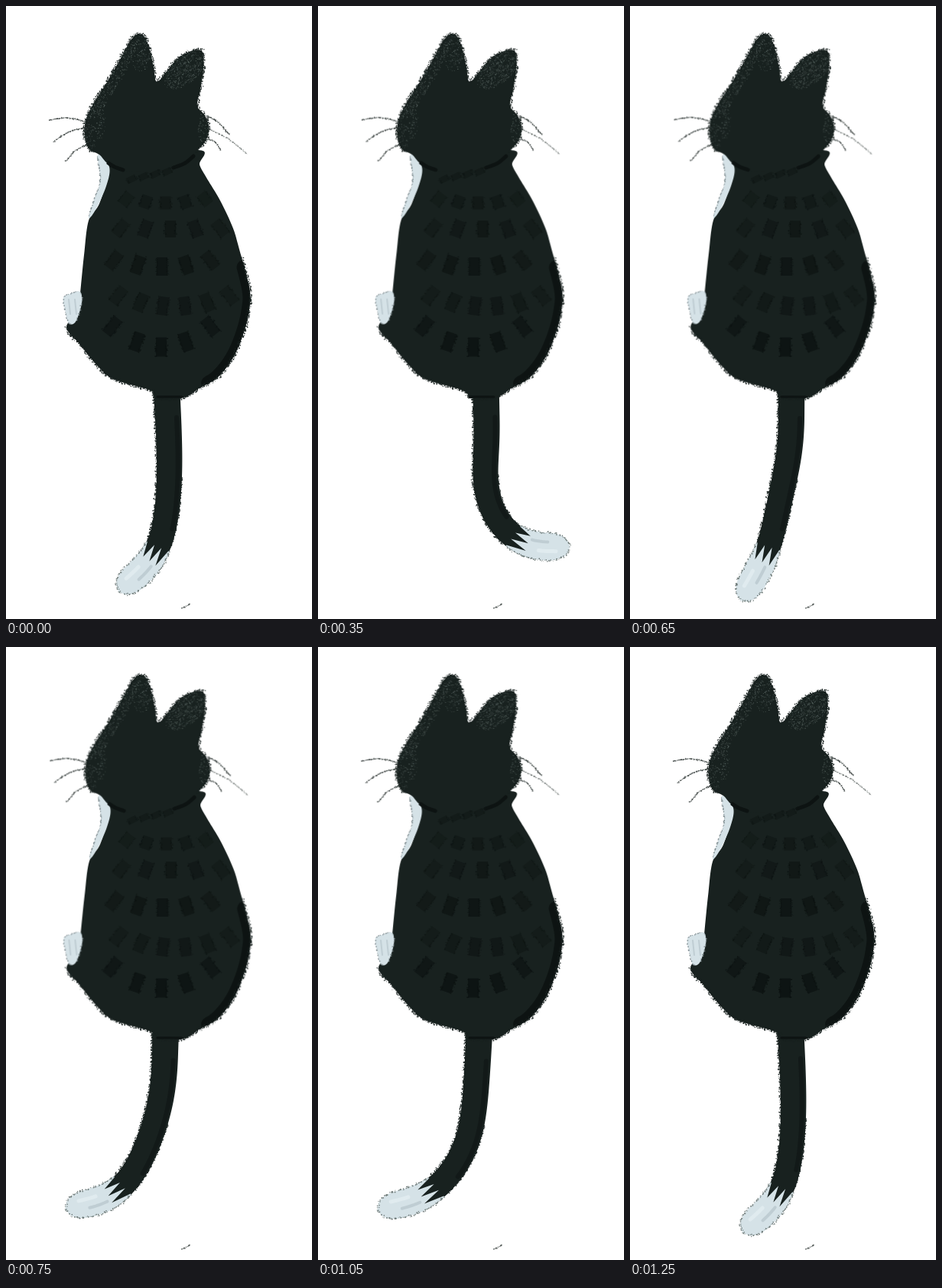
An HTML page with a canvas that plays this animation: 400x800 px, repeating every 1300 ms.

```html
<!DOCTYPE html>
<html lang="en">
<head>
<meta charset="utf-8">
<title>Cat tail</title>
<style>
  html, body { margin: 0; width: 100%; height: 100%; overflow: hidden; background: #fff; }
  canvas { display: block; width: 400px; height: 800px; }
</style>
</head>
<body>
<canvas id="stage" width="400" height="800"></canvas>
<script>
const LOOP = 1300, SWING = 1250, STEP = 50;
const INK = '#18211f', DARK = '#0d1312', WHITE = '#d5e2e7';

// Key poses of the tail: time, root x, length, then its bend in degrees from root to tip.
const POSES = [
  [0,    210, 286,  3,  -1, -13,  -48],
  [200,  217, 256,  2,   2,  30,   87],
  [300,  219, 275,  2,   4,  40,   96],
  [500,  219, 288,  0, -16,  15,   50],
  [650,  211, 288,  0, -11, -14,  -30],
  [850,  208, 306, -3, -18, -45, -106],
  [1050, 211, 303, -3,  -9, -38,  -76]
];

// Outline key points as x, y pairs.
const HEAD = [172,37, 181,40, 188,58, 193,80, 198,99, 221,72, 239,60, 256,59, 258,82, 254,108,
  250,130, 260,143, 265,158, 262,174, 250,188, 220,212, 160,216, 134,206, 122,194, 109,187,
  103,171, 104,150, 114,128, 131,101, 149,70, 163,45];
const BODY = [134,205, 134,218, 122,258, 108,280, 102,325, 97,375, 95,398, 79,419, 96,441, 120,470,
  141,487, 190,502, 200,512, 232,511, 254,498, 276,485, 296,460, 310,428, 318,395, 318,368,
  304,314, 296,288, 280,254, 262,224, 253,207, 251,188];
const CHEST = [120,194, 135,210, 131,235, 117,266, 108,277, 114,256, 123,228];
const PAW = [75,381, 86,375, 97,373, 99,388, 91,412, 82,414, 78,400];

const clamp = (v, lo, hi) => Math.max(lo, Math.min(hi, v));

function random(seed) {
  return () => {
    seed = (seed * 16807) % 2147483647;
    return seed / 2147483647;
  };
}

// Points along a Catmull-Rom curve.
function spline(list, closed = false, n = 10) {
  const len = list.length / 2, segs = closed ? len : len - 1, out = [];
  const at = i => {
    const j = closed ? (i + len) % len : clamp(i, 0, len - 1);
    return [list[2 * j], list[2 * j + 1]];
  };
  for (let k = 0; k < segs * n; k++) {
    const i = Math.floor(k / n), u = k / n - i;
    const q = [at(i - 1), at(i), at(i + 1), at(i + 2)];
    out.push([0, 1].map(c => {
      const [a, b, d, e] = q.map(v => v[c]);
      return b + .5 * u * (d - a + u * (2 * a - 5 * b + 4 * d - e + u * (3 * (b - d) + e - a)));
    }));
  }
  if (!closed) out.push(at(len - 1));
  return out;
}

function trace(g, pts) {
  g.beginPath();
  pts.forEach(([x, y]) => g.lineTo(x, y));
}

function fill(g, pts, color) {
  g.fillStyle = color;
  trace(g, pts);
  g.fill();
}

function stroke(g, pts, color, width) {
  g.strokeStyle = color;
  g.lineWidth = width;
  g.lineCap = 'round';
  trace(g, pts);
  g.stroke();
}

// Charcoal crumbs scattered about a line, densest in the middle.
function grain(g, pts, color, spread, density, seed) {
  const rnd = random(seed), jitter = () => (rnd() + rnd() - 1) * 1.4 * spread;
  g.fillStyle = color;
  for (let i = 1; i < pts.length; i++) {
    const [ax, ay] = pts[i - 1], [bx, by] = pts[i];
    const count = Math.floor(Math.hypot(bx - ax, by - ay) * density + rnd());
    for (let k = 0; k < count; k++) {
      const u = rnd(), s = .6 + rnd();
      g.fillRect(ax + (bx - ax) * u + jitter() - s / 2, ay + (by - ay) * u + jitter() - s / 2, s, s);
    }
  }
}

function speckle(g, x, y, rx, ry, tilt, count) {
  const rnd = random(x);
  g.save();
  g.translate(x, y);
  g.rotate(tilt);
  for (let i = 0; i < count; i++) {
    const a = rnd() * 2 * Math.PI, r = Math.sqrt(rnd());
    g.fillStyle = `rgba(150,165,160,${.12 + rnd() * .3})`;
    g.fillRect(Math.cos(a) * r * rx, Math.sin(a) * r * ry, .7 + rnd() * .8, .9);
  }
  g.restore();
}

function dash(g, x, y, tilt, alpha, w, h) {
  g.save();
  g.translate(x, y);
  g.rotate(tilt * Math.PI / 180);
  g.globalAlpha = alpha;
  g.fillStyle = DARK;
  g.fillRect(-w / 2, -h / 2, w, h);
  for (const side of [-w / 2, w / 2]) grain(g, [[side, -h / 2], [side, h / 2]], DARK, 1.5, 1, Math.round(x * 91 + y));
  g.restore();
}

// One fanned row of fur dashes that sags by `bulge` in the middle.
function dashRow(g, x0, x1, count, y, bulge, alpha, h) {
  for (let i = 0; i < count; i++) {
    const q = 2 * i / (count - 1) - 1, mid = 1 - q * q;
    dash(g, x0 + (x1 - x0) * (q + 1) / 2, y + bulge * mid, -38 * q, alpha + .25 * mid, 14, h);
  }
}

function whisker(g, x0, y0, x1, y1) {
  const pts = spline([x0, y0, (x0 + x1) / 2, (y0 + y1) / 2 - 4, x1, y1]);
  stroke(g, pts, 'rgba(110,120,117,.5)', 1);
  grain(g, pts, 'rgba(43,51,49,.7)', .8, 1.2, x1);
}

function paintCat() {
  const layer = document.createElement('canvas');
  layer.width = 400;
  layer.height = 800;
  const g = layer.getContext('2d');
  const head = spline(HEAD, true), body = spline(BODY, true);
  const chest = spline(CHEST, true), paw = spline(PAW, true);
  const inside = (pts, paint) => {
    g.save();
    trace(g, pts);
    g.clip();
    paint();
    g.restore();
  };

  fill(g, body, INK);
  inside(body, () => stroke(g, body.slice(145, 196), DARK, 20));
  grain(g, body.slice(70, 198), INK, 2.2, 2.2, 12);
  fill(g, chest, WHITE);
  grain(g, chest.slice(40), '#7c898d', .7, .7, 31);
  fill(g, paw, WHITE);
  for (const x of [82, 90]) stroke(g, [[x, 383], [x + 2, 402]], '#bfcdd3', 2);
  grain(g, paw, '#8b979b', .8, .6, 44);

  fill(g, head, INK);
  grain(g, head.slice(0, 142), INK, 2.2, 2.2, 7);
  grain(g, [...head.slice(185), head[0]], INK, 2.2, 2.2, 8);
  inside(head, () => {
    speckle(g, 140, 96, 9, 62, .53, 300);
    speckle(g, 175, 60, 14, 25, 0, 150);
    speckle(g, 233, 84, 32, 17, -.7, 420);
    speckle(g, 115, 158, 14, 28, .2, 150);
    speckle(g, 258, 158, 8, 20, 0, 70);
  });

  stroke(g, spline([134,205, 142,210, 153,214]), DARK, 5);
  stroke(g, spline([219,211, 234,205, 245,196]), DARK, 5);
  for (let i = 0; i < 4; i++) dash(g, 164 + i * 15.5, 226 - i * 3.3, -25, .45, 12, 8);
  dashRow(g, 157, 260, 5, 252, 5, .3, 17);
  dashRow(g, 150, 280, 5, 290, 1, .35, 22);
  dashRow(g, 141, 267, 5, 332, 8, .5, 24);
  dashRow(g, 147, 292, 6, 378, 14, .35, 24);
  dashRow(g, 139, 267, 5, 418, 27, .65, 25);
  stroke(g, [[198, 510], [230, 510]], DARK, 3);

  whisker(g, 104, 151, 56, 149);
  whisker(g, 104, 159, 62, 177);
  whisker(g, 104, 182, 78, 203);
  whisker(g, 262, 143, 292, 168);
  whisker(g, 264, 174, 281, 188);
  g.globalAlpha = .5;
  whisker(g, 263, 160, 315, 193);
  return layer;
}

// Smooth cyclic interpolation between the key poses.
function poseAt(t) {
  const n = POSES.length;
  const key = i => {
    const turn = Math.floor(i / n), [time, ...rest] = POSES[i - turn * n];
    return [time + turn * SWING, ...rest];
  };
  t %= SWING;
  let i = n - 1;
  while (POSES[i][0] > t) i--;
  const [a, b, c, d] = [i - 1, i, i + 1, i + 2].map(key);
  const h = c[0] - b[0], u = (t - b[0]) / h, v = 1 - u;
  return b.map((from, k) => {
    const m0 = (c[k] - a[k]) / (c[0] - a[0]) * h, m1 = (d[k] - b[k]) / (d[0] - b[0]) * h;
    return (1 + 2 * u) * v * v * from + u * v * v * m0 + u * u * (3 - 2 * u) * c[k] - u * u * v * m1;
  });
}

const SEGS = 76, CUT = 55;

// Walk down the tail, turning by the interpolated bend.
function tailSpine(t) {
  const [, rootX, length, ...bend] = poseAt(t);
  const angles = spline(bend.flatMap((a, i) => [i, a]), false, 20);
  let x = rootX, y = 500;
  const pts = [[x, y]];
  for (let i = 0; i < SEGS; i++) {
    const a = angles[clamp(i - 8, 0, angles.length - 1)][1] * Math.PI / 180;
    x += Math.sin(a) * length / SEGS;
    y += Math.cos(a) * length / SEGS;
    pts.push([x, y]);
  }
  return pts;
}

function drawTail(g, t) {
  const spine = tailSpine(t);
  const offset = (i, w) => {
    const [ax, ay] = spine[Math.max(0, i - 1)], [bx, by] = spine[Math.min(SEGS, i + 1)];
    const len = Math.hypot(bx - ax, by - ay);
    return [spine[i][0] + (by - ay) / len * w, spine[i][1] - (bx - ax) / len * w];
  };
  const halfWidth = i => {
    const u = i / SEGS, cap = Math.max(0, (u - .9) / .1);
    return (17.3 - 2 * u + 2.5 * clamp((u - .7) / .12, 0, 1)) * Math.sqrt(Math.max(0, 1 - cap * cap));
  };
  const along = (from, to, w) => spine.slice(from, to).map((_, k) => offset(from + k, w(from + k)));
  const left = along(0, SEGS + 1, i => -halfWidth(i)), right = along(0, SEGS + 1, halfWidth);

  fill(g, [...left.slice(0, CUT + 7), ...right.slice(0, CUT + 7).reverse()], INK);
  grain(g, left.slice(0, CUT), INK, 1.8, 1.8, 81);
  grain(g, right.slice(30, CUT), INK, .9, .8, 82);
  stroke(g, along(10, CUT - 6, () => 11), 'rgba(13,19,18,.5)', 6);

  // White tip with a ragged upper edge
  const rag = Array.from({ length: 7 }, (_, j) => offset(CUT + (j % 2 ? 6 : 0), 15 - 5 * j));
  fill(g, [...left.slice(CUT), ...right.slice(CUT).reverse(), ...rag], WHITE);
  stroke(g, along(CUT + 7, CUT + 14, () => 6), '#bfcdd3', 4);
  stroke(g, along(CUT + 10, CUT + 17, () => -6), '#e0ebef', 5);
  grain(g, left.slice(CUT), '#6a7674', 1.3, .8, 83);
  grain(g, right.slice(CUT), '#6a7674', 1.3, .8, 84);
}

const ctx = document.getElementById('stage').getContext('2d');
const cat = paintCat();

function draw(t) {
  ctx.fillStyle = '#fff';
  ctx.fillRect(0, 0, 400, 800);
  grain(ctx, [[229, 786], [235, 784], [241, 780]], '#59605e', .5, 1.5, 5);
  drawTail(ctx, t);
  // The body sways very slightly with the tail.
  ctx.save();
  ctx.translate(200, 500);
  ctx.rotate((1 - Math.cos(2 * Math.PI * t / SWING)) * .0022);
  ctx.drawImage(cat, -200, -500);
  ctx.restore();
}

let shown = -1;
const start = performance.now();
function tick() {
  const t = Math.floor((performance.now() - start) % LOOP / STEP) * STEP;
  if (t !== shown) draw(shown = t);
  requestAnimationFrame(tick);
}
tick();
</script>
</body>
</html>
```
